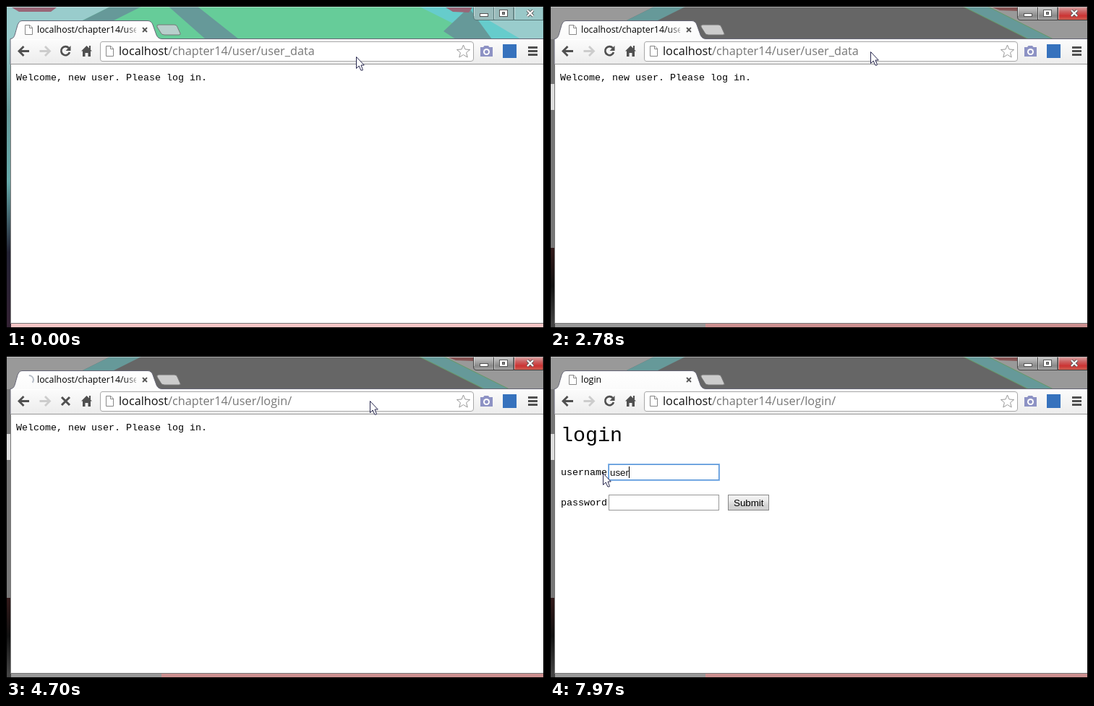
Write an HTML page with a canvas that moves like this. It is 744 px wide and 446 px high and loops after 8000 ms.

```html
<!DOCTYPE html>
<html lang="en">
<head>
<meta charset="utf-8">
<title>Login demo</title>
<style>
html, body { margin: 0; width: 100%; height: 100%; overflow: hidden; background: #fff; }
canvas { display: block; }
</style>
</head>
<body>
<canvas id="stage" width="744" height="446"></canvas>
<script>
const c = document.getElementById('stage').getContext('2d');
const LOOP = 8000;
const UI = '"Open Sans", "Noto Sans CJK SC", "Noto Sans CJK", sans-serif';
const URL_FONT = '16.25px ' + UI, BOLD = 'bold 16.3px ' + UI;
const MONO = '13.33px "Liberation Mono", monospace';
const FORM = '13.33px "Liberation Sans", sans-serif';
const BLUE = '#3399ff', GREEN = '#099409', GRAY = '#777';
const BASE = 'localhost/chapter14/user/', USER = 'user';

// Pointer path: time, x, y
const path = [
  [0, 484, 70], [100, 484, 70], [270, 498, 66], [420, 498, 66], [620, 512, 63],
  [1530, 512, 63], [1760, 503, 62], [2620, 503, 62], [2780, 443, 63], [2849, 443, 63],
  [2850, 437, 62], [3140, 437, 62], [3500, 346, 62], [3740, 346, 62], [3980, 503, 62],
  [5869, 503, 62], [5870, 421, 86], [6159, 421, 86], [6220, 58, 121], [6289, 58, 121],
  [6370, 5, 150], [6510, 108, 160], [6750, 108, 160], [6860, 117, 163], [7119, 117, 163],
  [7300, 68, 162], [7969, 68, 162], [7970, 73, 162], [LOOP, 73, 162]
];

const within = (t, a, b) => t >= a && t < b;

function pointer(t) {
  const i = path.findIndex(k => k[0] > t);
  const [t0, x0, y0] = path[i - 1], [t1, x1, y1] = path[i];
  const p = (t - t0) / (t1 - t0);
  return [Math.round(x0 + (x1 - x0) * p), Math.round(y0 + (y1 - y0) * p)];
}

function box(x, y, w, h, fill, stroke) {
  if (fill) { c.fillStyle = fill; c.fillRect(x, y, w, h); }
  if (stroke) { c.strokeStyle = stroke; c.lineWidth = 1; c.strokeRect(x + .5, y + .5, w - 1, h - 1); }
}

function draw(d, fill, stroke, width = 1, x = 0, y = 0) {
  const p = new Path2D(d);
  c.save();
  c.translate(x, y);
  if (fill) { c.fillStyle = fill; c.fill(p); }
  if (stroke) { c.strokeStyle = stroke; c.lineWidth = width; c.stroke(p); }
  c.restore();
}

function text(s, x, y, color, font) {
  c.font = font;
  c.fillStyle = color;
  c.fillText(s, x, y);
  return x + c.measureText(s).width;
}

function fade(y0, y1, ...colors) {
  const g = c.createLinearGradient(0, y0, 0, y1);
  colors.forEach((k, i) => g.addColorStop(i / (colors.length - 1), k));
  return g;
}

function wallpaper(tinted) {
  if (tinted) {
    box(0, 0, 744, 446, '#66cc99');
    draw('M0 0H146L54 46H0Z', '#99cccc');
    draw('M146 0H189L97 46H54Z', '#669999');
    draw('M224 0H264L322 46H276Z', '#669999');
    draw('M570 0H744V46H662Z', '#66cccc');
    draw('M640 2L605 35L622 46H672Z', '#669999');
    draw('M668 20H744V46H712Z', '#99cccc');
    draw('M8 2H70L62 8H18ZM608 2H645L640 9L618 8Z', '#996677');
    box(0, 46, 7, 400, fade(46, 440, '#99cccc', '#669999', '#66aaaa', '#222233', '#332233'));
    box(7, 440, 737, 6, '#f5c6c6');
  } else {
    box(0, 0, 744, 446, '#666666');
    draw('M0 0H146L54 46H0Z', '#999999');
    draw('M146 0H189L97 46H54Z', '#669999');
    draw('M570 0H744V46H662Z', '#999999');
    draw('M570 0H604L696 46H662Z', '#669999', '#669966');
    draw('M612 2H655L648 7L622 6Z', '#885555');
    box(0, 46, 7, 400, '#777');
    box(1, 108, 5, 36, '#ddd');
    box(0, 335, 7, 111, fade(335, 440, '#331a1a', '#111', '#444'));
    box(7, 440, 737, 6, '#999');
    box(215, 440, 529, 6, '#cc9090');
  }
}

function windowButtons(tinted) {
  const edge = tinted ? '#557777' : '#444';
  draw('M646.5 1V15Q646.5 19.5 651 19.5H702V1Z', tinted ? '#99bbbb' : fade(1, 20, '#ccc', '#aaa', '#888', '#aaa'), edge);
  draw('M702.5 1V19.5H743V1Z', tinted ? '#99c8c8' : fade(1, 20, '#ddaaaa', '#cc6666', '#cc3333', '#cc6655'), edge);
  draw('M674.5 1V19', null, edge);
  draw('M647.5 1V14M675.5 1V18M703.5 1V18', null, 'rgba(255,255,255,.5)');
  box(655, 10, 12, 5, '#fff', '#555');
  box(682, 5, 12, 10, '#fff', '#555');
  box(686, 8, 4, 4, '#888', '#555');
  draw('M721 6L729 14M729 6L721 14', null, '#555', 4);
  draw('M721 6L729 14M729 6L721 14', null, '#fff', 2.4);
}

function pageIcon(x, y, h, color = '#888') {
  draw(`M.5 .5H7L10.5 4V${h - .5}H.5ZM6.5 .5V4.5H10.5`, '#fff', color, 1, x, y);
}

function browser(t, loading, editing) {
  const tinted = t < 100;
  wallpaper(tinted);
  windowButtons(tinted);

  draw('M209 29Q208 26 211 26H233Q236 26 237 29L241 38Q242 40 239 40H219Q215 40 214 37Z',
    tinted ? '#b8cfcc' : '#cccccc', '#777');
  draw('M6 45.5C12 45 12 40 15 30Q17 20.5 22 20.5H196Q201 20.5 203 26L208 40Q210 45.5 216 45.5H744V81H6Z',
    fade(20, 80, '#fff', '#fafafa', '#ececec'), '#667');
  box(7, 46, 737, 1, '#fff');
  box(6, 80, 738, 1, '#999');
  box(6, 81, 1, 359, '#777');
  box(7, 81, 736, 359, '#fff');
  box(6, 439, 738, 1, '#777');

  // Tab
  if (loading) {
    const a = (t - (t < 2000 ? 1180 : 4700)) > 350 ? t / 90 : -1.6;
    c.beginPath();
    c.arc(32, 33, 6, a, a + 2.3);
    c.strokeStyle = '#b5bcc6';
    c.lineWidth = 2;
    c.stroke();
  } else pageIcon(26, 26, 14);
  const title = t < 5600 ? 'localhost/chapter14/user' : 'login';
  c.save();
  c.beginPath();
  c.rect(40, 22, 140, 22);
  c.clip();
  const g = c.createLinearGradient(162, 0, 182, 0);
  g.addColorStop(0, '#000');
  g.addColorStop(1, '#bbb');
  text(title, 43, 37, g, '12.4px ' + UI);
  c.restore();
  draw('M189 30L195 36M195 30L189 36', null, '#555', 1.8);

  // Toolbar
  const arrow = 'M8 0L1.5 6.5L8 13M2 6.5H15.5';
  draw(arrow, null, '#505050', 2.8, 16.5, 56);
  c.save();
  c.translate(62, 56);
  c.scale(-1, 1);
  draw(arrow, null, '#cccccc', 2.8);
  c.restore();
  if (loading) draw('M77 57L88 68M88 57L77 68', null, '#505050', 3);
  else {
    draw('M86.8 58.2A6 6 0 1 0 88 64', null, '#505050', 2.6);
    draw('M89.5 55V62H82.5Z', '#505050');
  }
  draw('M104 62.5L111.5 55L119 62.5H117V70H113.5V65H109.5V70H106V62.5ZM115 55H117V60H115Z', '#505050');

  draw('M133 49.5H643Q646.5 49.5 646.5 53V73Q646.5 76.5 643 76.5H133Q130.5 76.5 130.5 73V53Q130.5 49.5 133 49.5Z',
    '#fff', '#a8a8a8');
  pageIcon(138, 55, 15);
  if (!editing)
    draw('M632.5 54L635 60L641.5 60.5L636.6 64.6L638.2 71L632.5 67.5L626.8 71L628.4 64.6L623.5 60.5L630 60Z',
      '#fff', '#999');

  draw('M656 57H660L661.5 55H667L668.5 57H673V70H656Z', '#8d92c4');
  draw('M660 63.5a4.5 4.5 0 1 0 9 0a4.5 4.5 0 1 0 -9 0', '#fff');
  draw('M662 63.5a2.5 2.5 0 1 0 5 0a2.5 2.5 0 1 0 -5 0', '#8d92c4');
  box(687, 53, 19, 19, '#3672bd');
  for (let y = 56; y < 70; y += 5) box(722, y, 13, 3, '#505050');
}

function address(t, mouseX) {
  const tail = t < 4160 ? 'user_data' : 'login/';
  const url = BASE + tail, left = 156, y = 68;
  c.font = URL_FONT;
  const edge = n => left + c.measureText(url.slice(0, n)).width;
  const end = url.length;
  let from = end;
  if (within(t, 270, 550)) from = 0;
  if (within(t, 3140, 4160)) {
    while (from > BASE.length && edge(from - 1) > mouseX + 7) from--;
    if (t >= 3500) from = BASE.length;
  }
  if (within(t, 4160, 4700)) from = BASE.length;

  // Host, path and selection are painted side by side
  const host = 'localhost'.length;
  text(url.slice(0, host), left, y, '#111', URL_FONT);
  text(url.slice(host), edge(host), y, GRAY, URL_FONT);
  if (from < end) {
    box(edge(from), 51, edge(end) - edge(from), 22, BLUE);
    text(url.slice(from), edge(from), y, '#fff', URL_FONT);
  }
}

function suggestions() {
  box(7, 81, 736, 181, '#fff');
  box(7, 261, 736, 2, '#aaa');
  box(131, 87, 514, 28, BLUE);
  const rows = [['login/', 419], ['user_data'], ['login/?next=/chapter14/li...', 593], ['register', 431], ['login']];
  rows.forEach(([tail, noteX], i) => {
    const y = 107 + 28 * i, color = i ? GREEN : '#66ff77';
    pageIcon(138, y - 13, 14, i ? '#888' : '#bbb');
    text(BASE, 156, y, color, BOLD);
    text(tail, 369, y, color, URL_FONT);
    if (noteX) text('- login', noteX, y, i ? GRAY : '#a5d5ff', URL_FONT);
  });
  draw('M138 239a4 4 0 1 0 8 0a4 4 0 1 0 -8 0M145 242L150 247', null, '#999', 2);
  text(BASE, 156, 247, '#111', URL_FONT);
  text('- Nurl 搜索', 358, 247, GRAY, URL_FONT);
}

function field(y, filled, focused) {
  box(81, y, 153, 22, filled ? '#ffffcc' : '#fff', '#999');
  if (focused) {
    box(80, y - 1, 155, 24, null, '#8bb8ea');
    box(81, y, 153, 22, null, '#5a96d8');
  } else if (filled) {
    box(81, y, 153, 2, '#888');
    box(81, y, 2, 22, '#888');
    box(232, y + 2, 2, 20, '#eee');
    box(83, y + 20, 151, 2, '#eee');
  }
}

function loginPage(t) {
  const filled = within(t, 6350, 7300), focused = t >= 6750;
  text('login', 15, 118, '#000', '28.3px "Liberation Mono", monospace');
  text('username', 15, 165, '#000', MONO);
  text('password', 15, 207, '#000', MONO);
  field(150, filled, focused);
  field(192, filled, false);

  const typed = Math.max(0, Math.floor((t - 7480) / 70));
  const value = filled ? 'qv' : USER.slice(0, typed);
  const marked = within(t, 7180, 7300);
  c.font = FORM;
  if (marked) box(83, 153, c.measureText(value).width, 16, BLUE);
  const end = text(value, 83, 166, marked ? '#fff' : '#111', FORM);
  if (focused && !marked) box(Math.round(end), 153, 1, 16, '#000');
  if (filled)
    for (const x of [86, 91]) draw('M-2 0a2 2 0 1 0 4 0a2 2 0 1 0 -4 0', '#111', null, 1, x, 203.5);

  box(246, 192, 57, 22, fade(192, 214, '#f4f4f4', '#ececec', '#d4d4d4', '#cfcfcf'), '#888');
  text('Submit', 254, 208, '#000', FORM);

  if (within(t, 7550, 7830)) {
    box(81, 173, 153, 26, '#fff', '#999');
    text(USER, 85, 190, '#111', FORM);
  }
}

function mouse(t, x, y) {
  if (within(t, 2380, 2440))
    draw('M-4 -8H-1L0 -7L1 -8H4M0 -7V7M-4 8H-1L0 7L1 8H4', null, '#000', 1, x + .5, y + .5);
  else
    draw('M.5 .5V16.5L4.2 13L6.8 19H9.2V17.5L7 12H11.3Z', '#fff', '#26264d', 1, x, y);
}

function render(t) {
  const [x, y] = pointer(t);
  const loading = within(t, 1180, 1760) || within(t, 4700, 5600);
  const editing = within(t, 4160, 4700);
  c.clearRect(0, 0, 744, 446);
  browser(t, loading, editing);
  address(t, x);
  if (t >= 5600) loginPage(t);
  else text('Welcome, new user. Please log in.', 14, 103, '#000', MONO);
  if (editing) suggestions();
  box(0, 0, 744, 446, null, '#000');
  box(1, 1, 742, 1, 'rgba(255,255,255,.45)');
  mouse(t, x, y);
}

const start = performance.now();
function tick(now) {
  render(Math.max(0, now - start) % LOOP);
  requestAnimationFrame(tick);
}
requestAnimationFrame(tick);
</script>
</body>
</html>
```
